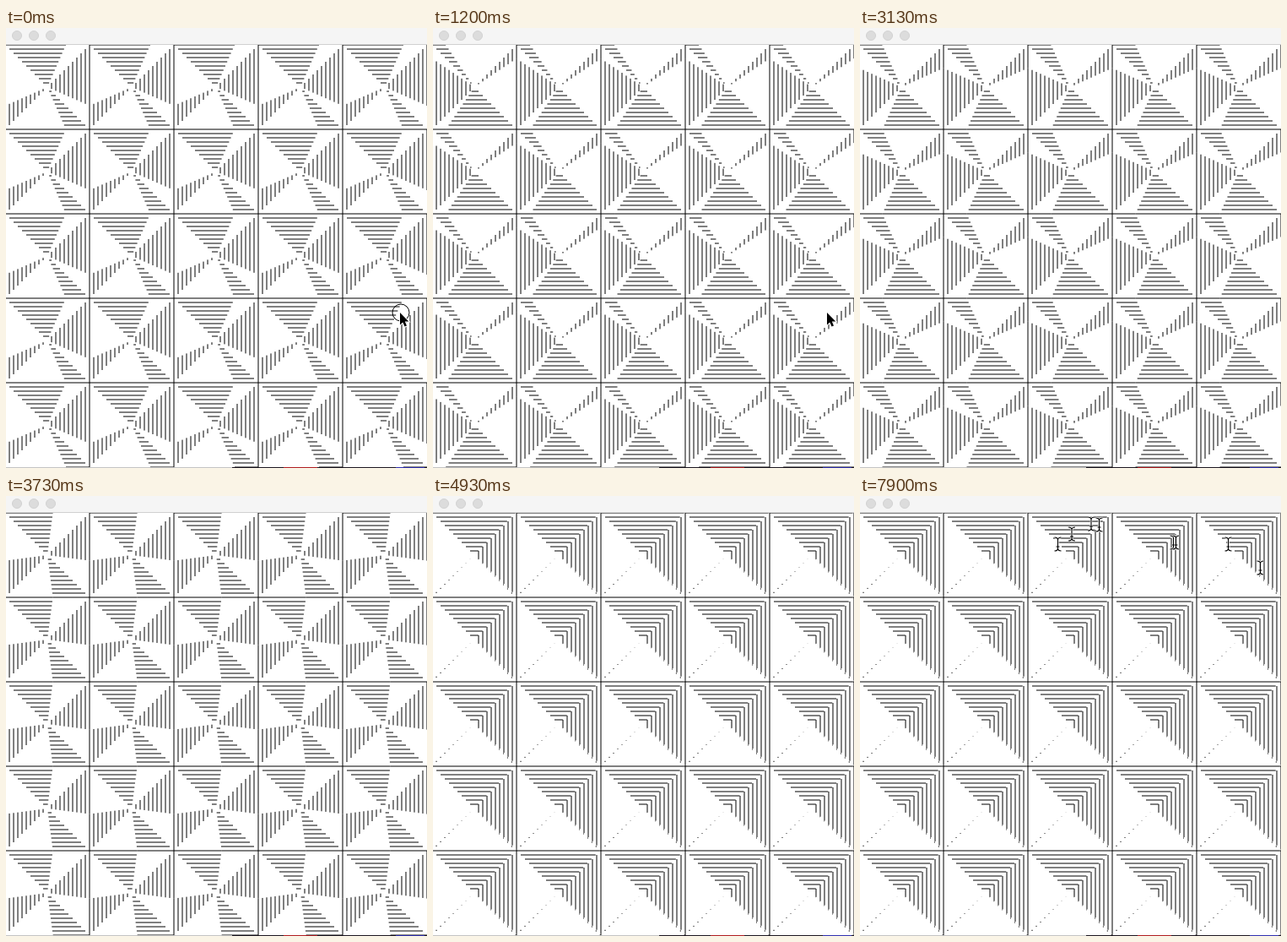
An HTML page with a canvas that plays this animation: 499x521 px, repeating every 8000 ms.

```html
<!DOCTYPE html>
<html lang="en">
<head>
<meta charset="utf-8">
<title>Rotating squares</title>
<style>
  html, body { margin: 0; width: 100%; height: 100%; overflow: hidden; background: #fff; }
  canvas { display: block; }
</style>
</head>
<body>
<canvas id="stage" width="499" height="521"></canvas>
<script>
const ctx = document.getElementById('stage').getContext('2d');
const LOOP = 8000, CELL = 100, GAP = 5, TOP = 20;
const LAST_TURN = 4930;

// The picture advances in ticks of 150 ms, a few of them 10 ms shorter.
const SHORT_TICKS = [12, 16, 44, 48, 52];
const ticks = [0];
for (let i = 0; i < 53; i++) ticks.push(ticks[i] + (SHORT_TICKS.includes(i) ? 140 : 150));

// Text cursor trail: time of appearance, x, y
const TRAIL = [
  [6580, 474.5, 85], [6720, 436.5, 57], [6870, 234.5, 57], [7160, 251, 45],
  [7310, 274, 33], [7610, 283.5, 34], [7760, 371.5, 55], [7900, 374.5, 55]
];

function disc(x, y, r, fill, stroke) {
  ctx.beginPath();
  ctx.arc(x, y, r, 0, Math.PI * 2);
  if (fill) { ctx.fillStyle = fill; ctx.fill(); }
  ctx.strokeStyle = stroke;
  ctx.lineWidth = 1;
  ctx.stroke();
}

function bar(x, y, w, h, color) {
  ctx.fillStyle = color;
  ctx.fillRect(x, y, w, h);
}

function drawWindow() {
  bar(0, 0, 499, 521, '#fff');
  bar(0, 0, 499, 19, '#f5f5f5');
  bar(0, 19, 499, 1, '#d0d0d0');
  for (const x of [13, 33, 53]) disc(x, 9, 5.5, '#dcdcdc', '#d2d2d2');
  bar(0, 520, 268, 1, '#c4c4c4');
  bar(268, 520, 231, 1, '#1c1620');
  bar(329, 520, 40, 1, '#b01c20');
  bar(462, 520, 34, 1, '#3030b0');
}

// Each side is drawn clockwise from its corner: two sides grow while the others shrink.
function addSquare(x, y, size, part) {
  const long = size * part, rest = size - long;
  const right = x + size, bottom = y + size;
  ctx.moveTo(x, y);          ctx.lineTo(x + long, y);
  ctx.moveTo(right, y);      ctx.lineTo(right, y + long);
  ctx.moveTo(right, bottom); ctx.lineTo(right - rest, bottom);
  ctx.moveTo(x, bottom);     ctx.lineTo(x, bottom - rest);
}

function drawGrid(part) {
  ctx.save();
  ctx.beginPath();
  ctx.rect(0, TOP, 499, 500);
  ctx.clip();
  ctx.strokeStyle = '#000';
  ctx.lineWidth = 1;
  for (let row = 0; row < 5; row++) {
    for (let col = 0; col < 5; col++) {
      for (let inset = 0; inset < CELL / 2; inset += GAP) {
        ctx.beginPath();
        addSquare(col * CELL - 1 + inset, row * CELL + TOP + inset, CELL - 2 * inset, part);
        ctx.stroke();
      }
    }
  }
  ctx.restore();
}

function drawArrow(x, y) {
  const path = new Path2D('M0 0V14.5L3.3 11.4L5.6 16.6L8 15.6L5.8 10.5H10.3Z');
  ctx.save();
  ctx.translate(x, y);
  ctx.strokeStyle = '#fff';
  ctx.lineWidth = 2;
  ctx.stroke(path);
  ctx.fillStyle = '#000';
  ctx.fill(path);
  ctx.restore();
}

function drawTextCursor(x, y) {
  const path = new Path2D('M-4 -8Q0 -8 0 -5Q0 -8 4 -8M0 -5V5M-4 8Q0 8 0 5Q0 8 4 8M-2 3H2');
  ctx.save();
  ctx.translate(x, y);
  for (const [color, width] of [['#fff', 2.4], ['#000', 1.1]]) {
    ctx.strokeStyle = color;
    ctx.lineWidth = width;
    ctx.stroke(path);
  }
  ctx.restore();
}

function draw(now) {
  const time = now % LOOP;
  const tick = ticks.findLast(start => start <= time);
  const angle = 1.115 + Math.min(tick, LAST_TURN) / 1000;

  drawWindow();
  drawGrid(0.5 + 0.5 * Math.cos(angle));
  if (tick < 150) disc(468, 337, 10, null, '#000');
  if (tick < 3000) drawArrow(467, 337);
  for (const [start, x, y] of TRAIL) if (tick >= start) drawTextCursor(x, y);
}

const begin = performance.now();
function loop() {
  draw(performance.now() - begin);
  requestAnimationFrame(loop);
}
loop();
</script>
</body>
</html>
```
